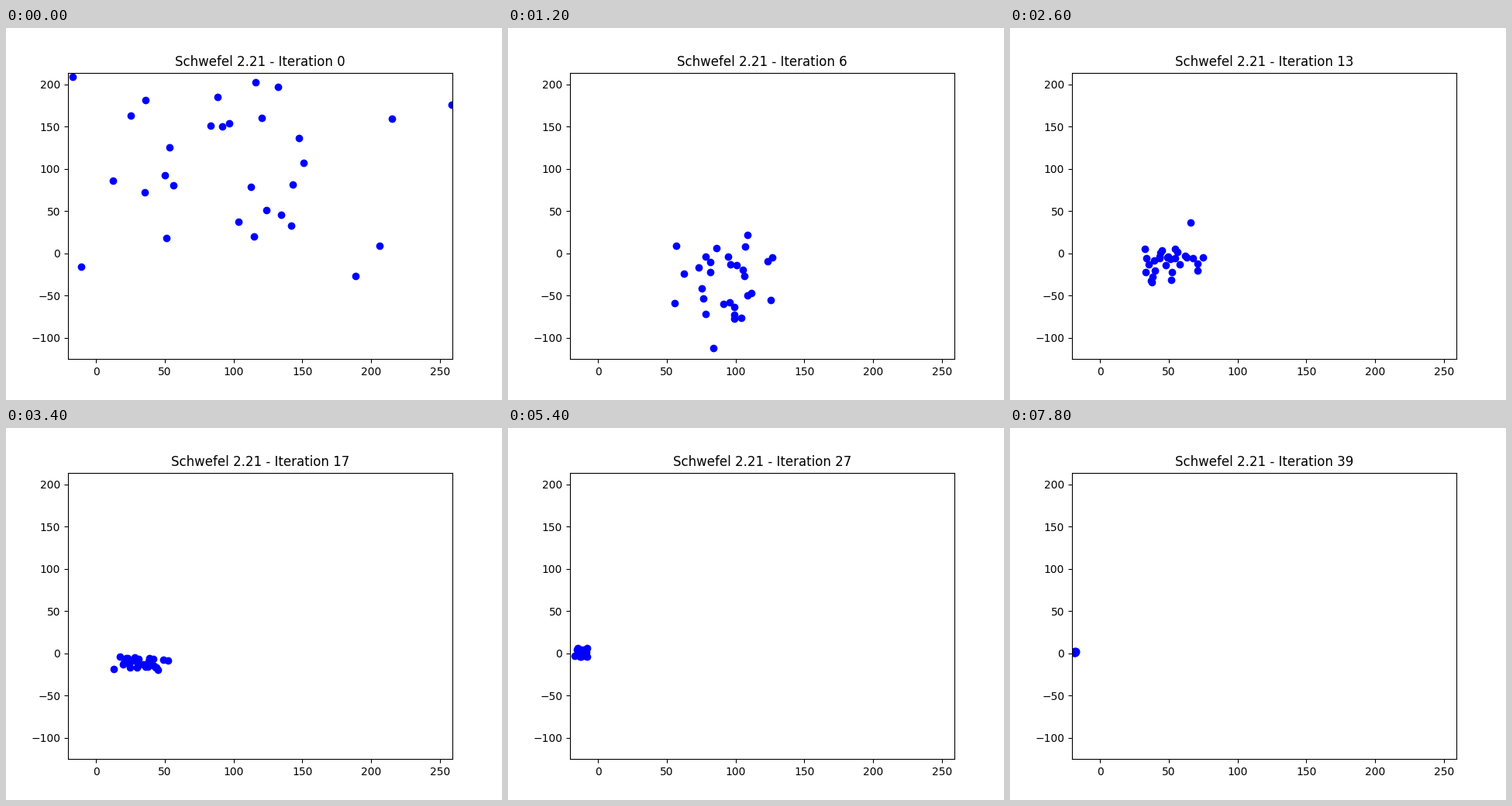
Write a matplotlib script that moves like this. It is 640 px wide and 480 px high and loops after 8 s.

```python
import numpy as np
import matplotlib.pyplot as plt
from matplotlib.animation import FuncAnimation

FRAMES, STEP_MS = 40, 200
SWARM = 30
SWIRL = 0.35  # radians each particle circles per iteration
LOW, HIGH = (-20.5, -125), (259.1, 213.7)

# iteration, centre x, centre y, spread x, spread y
KEYS = np.array([
    [0, 102, 104, 65, 68],
    [6, 93, -34, 19, 31],
    [13, 50, -9, 12, 14],
    [17, 32, -11, 10, 4.5],
    [27, -12, 0.5, 2.2, 3],
    [35, -16.3, 0, 0.8, 0.8],
    [39, -18.8, 1.5, 0.6, 0.4],
])


def unit_cloud(rng):
    """Random offsets with zero mean and unit spread on both axes."""
    cloud = rng.normal(size=(SWARM, 2))
    return (cloud - cloud.mean(axis=0)) / cloud.std(axis=0)


rng = np.random.default_rng(21)
home, drift = unit_cloud(rng), unit_cloud(rng)


def swarm_at(i):
    """The cloud swirls around its centre while it travels and shrinks."""
    steps = KEYS[:, 0]
    centre = [np.interp(i, steps, col) for col in KEYS[:, 1:3].T]
    spread = [np.exp(np.interp(i, steps, np.log(col))) for col in KEYS[:, 3:].T]
    offset = home * np.cos(SWIRL * i) + drift * np.sin(SWIRL * i)
    return np.clip(centre + offset * spread, LOW, HIGH)


fig, ax = plt.subplots(figsize=(6.4, 4.8), dpi=100)
ax.set_xlim(LOW[0], HIGH[0])
ax.set_ylim(LOW[1], HIGH[1])
dots = ax.scatter([], [], color="blue")
title = ax.set_title("")


def draw(i):
    dots.set_offsets(swarm_at(i))
    title.set_text(f"Schwefel 2.21 - Iteration {i}")
    return dots, title


anim = FuncAnimation(fig, draw, frames=FRAMES, interval=STEP_MS,
                     repeat=True, repeat_delay=0, blit=False)
plt.show()
```
